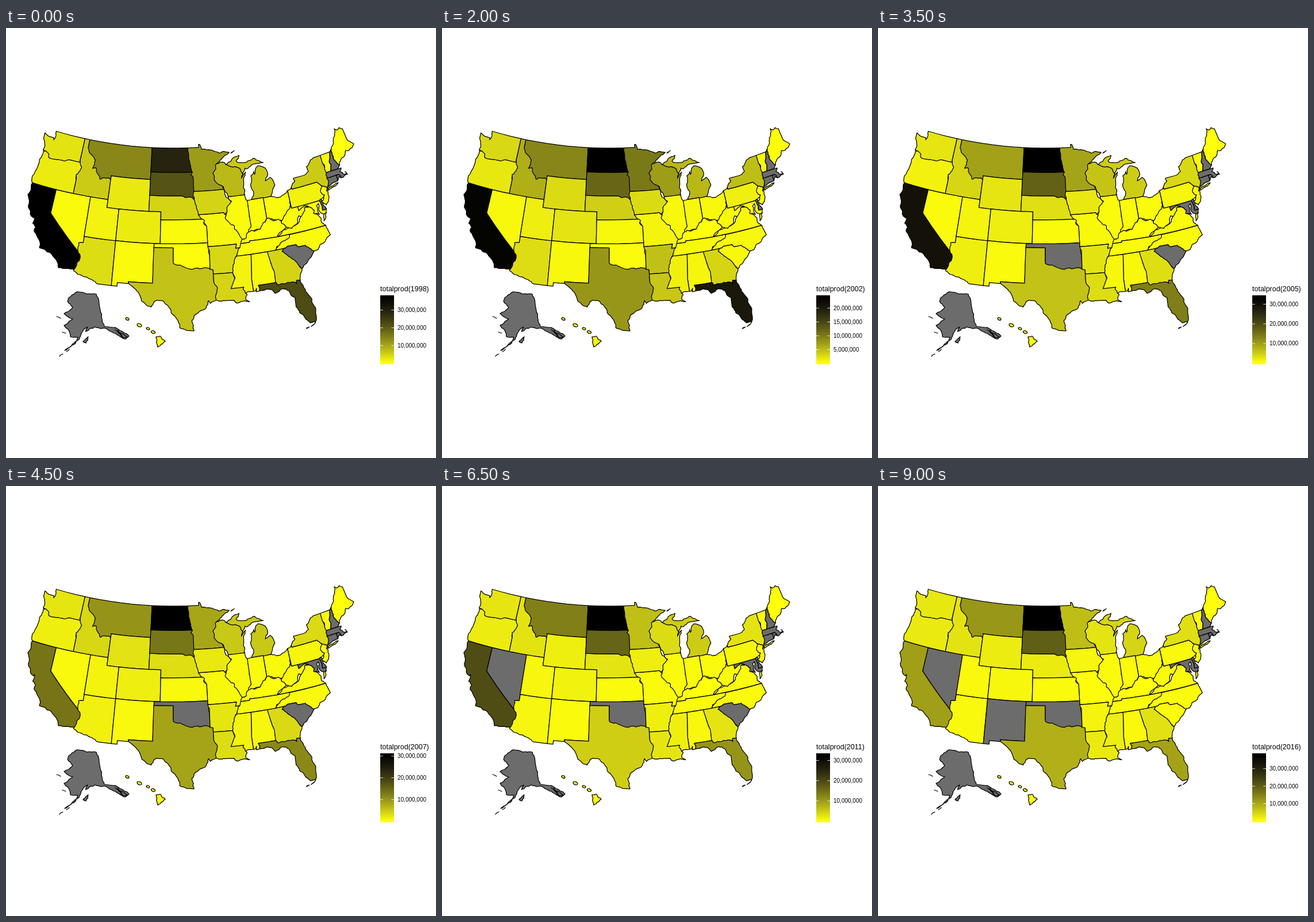
Recreate the animation shown at these times as an HTML page with a canvas. Size 748 by 748 pixels, loop 9.5 s.

```html
<!DOCTYPE html>
<html lang="en">
<head>
<meta charset="utf-8">
<title>Total production by state</title>
<style>
html, body { margin: 0; width: 100%; height: 100%; overflow: hidden; background: #fff; }
canvas { display: block; width: 748px; height: 748px; }
</style>
</head>
<body>
<canvas id="map" width="748" height="748"></canvas>
<script>
const ctx = document.getElementById('map').getContext('2d');
const START = 1998, YEARS = 19, HOLD = 500;
const parts = [];

// A corner is "west,north" in degrees. Borders along a meridian or parallel stay
// straight, "/" keeps the next diagonal straight, all others become rough.
// Later states cover the loose edges of earlier ones.
function state(id, outline, trend = '98:.8') {
  parts.push({ id, path: trace(outline, project), keys: keysOf(trend) });
}

// Sparse "yy:millions" keys, joined linearly over the years.
const keysOf = trend => trend && trend.split(' ').map(k => {
  const [y, v] = k.split(':').map(Number);
  return [y > 50 ? 1900 + y : 2000 + y, v];
});

// Azimuthal equal-area projection centred on 45 N, 100 W.
function project(lon, lat) {
  const r = Math.PI / 180, d = (100 - lon) * r, s = Math.sin(lat * r), c = Math.cos(lat * r);
  const h = Math.SQRT1_2, k = 795 * Math.sqrt(2 / (1 + h * (s + c * Math.cos(d))));
  return [291 + k * c * Math.sin(d), 264.5 - k * h * (s - c * Math.cos(d))];
}

// Midpoint displacement, equal in both directions so neighbours share a border.
function rough(path, [ax, ay], [bx, by]) {
  const dx = bx - ax, dy = by - ay, len = Math.hypot(dx, dy);
  if (len < 4) return path.lineTo(bx, by);
  const mx = (ax + bx) / 2, my = (ay + by) / 2;
  const seed = Math.sin(mx * 12.9898 + my * 78.233) * 43758.5453;
  const w = (seed - Math.floor(seed) - 0.5) * 0.3 * Math.sign(dx || dy) * Math.min(1, 11 / len);
  const mid = [mx - dy * w, my + dx * w];
  rough(path, [ax, ay], mid);
  rough(path, mid, [bx, by]);
}

function trace(outline, place) {
  const path = new Path2D();
  for (const ring of outline.split('|')) {
    const pts = ring.split(' ').map(p => ({ ruled: p[0] === '/', at: p.replace('/', '').split(',').map(Number) }));
    path.moveTo(...place(...pts[0].at));
    pts.forEach(({ ruled, at: [x, y] }, i) => {
      const [u, v] = pts[(i + 1) % pts.length].at;
      if (!ruled && Math.min(Math.abs(u - x), Math.abs(v - y)) > 0.09) {
        return rough(path, place(x, y), place(u, v));
      }
      const n = Math.ceil(Math.abs(u - x) / 2) || 1;
      for (let j = 1; j <= n; j++) path.lineTo(...place(x + (u - x) * j / n, y + (v - y) * j / n));
    });
    path.closePath();
  }
  return path;
}

// West
state('ID', '117.03,49 116.05,49 116.05,48 112,45 111.05,44.7 111.05,42 117.03,42 117.03,43.9 117.25,44.4 117.04,45', '98:6 02:6 05:4.3 11:2.9 16:3.3');
state('MT', '116.05,49 104.05,49 104.05,45 111.05,45 111.05,44.5 111.4,44.7 112.9,44.36 113.45,44.95 113.95,45.7 114.55,45.56 114.32,46.65 115.7,47.45 116.05,48', '98:14.2 02:9.2 07:10.2 11:13.3 14:14.3 16:12.2');
state('AZ', '114.04,37 109.05,37 109.05,31.33 111.07,31.33 /114.81,32.5 115,33.2 114.9,34 114.85,35.3 114.9,36.2 114.04,36.2', '98:4 02:2.6 05:1.8 11:1.1 16:.9');
state('OR', '123.95,46.2 124.07,44.7 124.15,43.9 124.55,42.84 124.2,42 117.03,42 117.03,43.8 117.2,44.4 116.5,45.4 116.92,45.99 118.98,46 122.5,46 123,46.3', '98:2.4 05:1.5 16:2.6');
state('WA', '122.76,49 117.03,49 117.04,46.43 116.92,45.99 118.98,46 120.2,45.73 121.2,45.62 122.2,45.55 122.75,45.65 122.85,46.05 123.45,46.26 124.05,46.28 123.95,46.72 124.2,47.2 124.65,47.9 124.72,48.38 123.5,48.13 122.78,48.13 122.75,47.9 122.55,48.4', '98:3.3 07:2.6 16:2.8');
state('NV', '120,42 114.04,42 114.04,36.2 114.74,36.1 /114.63,35 120,39');
state('CA', '124.2,42 120,42 /120,39 114.63,35 114.14,34.3 114.53,33.5 114.72,32.72 117.12,32.53 117.28,33 118.1,33.73 118.5,34.03 119.2,34.15 119.6,34.4 120.5,34.45 120.6,35.1 121.9,36.3 121.8,36.8 122.4,37.2 122.3,37.6 122.4,38.07 122.52,37.85 122.95,38.02 123.7,38.9 123.8,39.5 124.38,40.44 124.1,41', '98:37.4 02:23.5 03:32.2 04:17.6 05:30 07:13.6 10:27.5 12:11.6 16:11.2');
state('UT', '114.04,42 111.05,42 111.05,41 109.05,41 109.05,37 114.04,37', '98:1.6 16:1');
state('WY', '111.05,45 104.05,45 104.05,41 111.05,41', '98:2.7 07:2.8 11:1.8 16:2.3');
state('CO', '109.05,41 102.05,41 102.05,37 109.05,37', '98:2.4 16:1.2');
state('NM', '109.05,37 103,37 103.04,32 106.62,32 /106.53,31.78 108.21,31.78 108.21,31.33 109.05,31.33');

// Plains and upper river valley
state('TX', '103.04,32 103.04,36.5 100,36.5 100,34.8 94.3,34 94.04,33.55 94.04,32 93.4,31.3 93.85,29.7 94.7,29.35 94.95,29.7 95.3,28.9 96.3,28.4 97.1,27.8 97.4,27.3 97.15,25.96 98.2,26.05 99.1,26.4 99.5,27.5 100.3,28.3 100.7,29.1 101.4,29.77 102.3,29.88 102.7,29.7 103.15,28.98 104.5,29.65 104.95,30.6 106.53,31.78 106.62,32', '98:7 02:7.9 05:6.3 07:8.6 11:4.9 14:9 16:9.2');
state('OK', '103,37 94.62,37 /94.43,35.4 94.48,33.64 95.25,33.92 96,33.75 96.65,33.9 97.2,33.75 97.9,33.9 98.6,34.15 100,34.56 100,36.5 103,36.5', '98:.6');
state('MN', '97.23,49 95.15,49 95.15,49.38 94.9,49.35 94.6,48.72 93.3,48.62 92,48.3 91.4,48.07 90.8,48.2 89.5,48 91.3,47.2 92.1,46.75 92,46.1 92,44.5 91.2,43.5 96.7,43.5 97.3,47', '98:11.5 05:9.5 11:6.4 16:7.5');
state('WI', '92.1,46.75 90.85,46.9 90.4,46.57 89.1,46.13 88.1,45.9 87.6,45.1 87.95,44.6 87.05,45.27 87.7,43.8 87.8,42.49 90.64,42.5 91.2,43.5 91.3,43.85 92.77,44.75 92.87,45.62 92.3,46.1 92.3,46.66', '98:8 02:7.4 07:5.2 11:3.6 16:3.2');
state('MO', '96,40.58 91.73,40.61 90.9,39.5 90,38.7 89.15,36.95 89.55,36 90.37,36 90.15,36.5 94.62,36.5 94.62,39 95.5,40', '98:1.2 16:.6');
state('IA', '96.7,43.5 91.2,43.5 91.1,42.75 90,41.8 91,40.7 91.42,40.38 91.73,40.61 96,40.58 96.7,42.5', '98:5 02:2.8 16:1.3');
state('NE', '104.05,43 97,43 96.45,42.49 96.1,41.7 95.87,40.75 95.3,40 102.05,40 102.05,41 104.05,41', '98:5 02:3.6 16:2.4');
state('KS', '102.05,40 95.3,40 94.9,39.8 95.1,39.5 94.61,39.1 94.62,37 102.05,37');
state('ND', '104.05,49 97.23,49 97.1,48 96.8,46.7 96.56,45.94 104.05,45.94', '98:29.4 00:34.5 01:26.9 02:24 05:33.7 06:25.9 08:35.1 10:46.4 11:32.7 13:33.1 14:42.1 16:37.8');
state('SD', '104.05,45.94 96.56,45.94 96.85,45.6 96.45,45.3 96.45,43.5 96.6,43.1 96.45,42.49 97.2,42.85 97.9,42.77 98.5,43 104.05,43', '98:21.4 02:12 05:17.4 07:13.3 11:16.5 14:24.4 16:19.9');

// South
state('AR', '94.62,36.5 90.15,36.5 90.37,36 89.6,36 90.8,33.9 91.1,33 94.04,33.02 94.04,33.55 /94.48,33.64 94.43,35.4', '98:4.6 02:4.7 05:3 11:1.8 16:1.5');
state('LA', '94.04,33.02 91.1,33 90.9,32 91.2,31.1 89.6,31 89.5,30.2 89.35,30 89.6,29.4 89.1,29.1 89.8,29.3 90.9,29.1 91.3,29.5 92.2,29.55 93.85,29.7 93.55,31.2 94.04,32', '98:5 05:3.6 11:2.7 16:2.6');
state('NC', '84.3,35 83.1,35 /82.4,35.2 81.05,35.15 /80.78,34.82 79.67,34.8 /78.55,33.86 77.95,33.88 77.4,34.45 76.55,34.65 /75.55,35.25 75.75,36 75.87,36.55 83,36.55');
state('SC', '83.1,35 /82.4,35.2 81.05,35.15 /80.78,34.82 79.67,34.8 /78.55,33.86 79.2,33.2 79.9,32.7 80.88,32.05 82,33.2 83.3,34.7');
state('AL', '88.2,35 85.6,35 /85.18,32.87 84.9,32.3 85.05,31 87.6,31 87.5,30.28 88,30.23 87.9,30.65 88.1,30.35 88.4,30.35 /88.47,31.9 88.1,34.9', '98:1');
state('GA', '85.6,35 83.1,35 83.35,34.7 82.6,34 81.5,33 80.88,32.03 81.45,30.7 82,30.5 84.9,30.6 85.05,31 85,32.3 /85.18,32.87', '98:5 02:3.2 07:3.6 11:2.8 14:4.2 16:3.6');
state('MS', '90.3,35 88.2,35 /88.1,34.9 88.47,31.9 88.4,30.35 89.55,30.2 89.85,30.7 89.73,31 91.6,31 90.9,32.2 91.15,33 91,33.95', '98:1.6 05:1.1 14:2.1');
state('FL', '87.6,31 85,31 84.86,30.7 82.2,30.57 82.05,30.37 82,30.78 81.45,30.7 /81,29.2 80.55,28.45 /80.35,27.5 80.03,26.8 80.15,25.75 80.4,25.2 81.1,25.15 81.75,25.95 82.7,27.5 82.65,28.7 83.7,29.95 84.2,30.08 85.35,29.66 85.7,30.15 86.5,30.38 87.5,30.28|80.35,25.2 80.75,24.85 81.1,24.68 80.7,24.83|81.35,24.67 81.8,24.55 81.5,24.67', '98:22.5 00:24.4 02:20.5 05:13.8 07:11.4 11:11 14:14.7 16:10.8');

// Middle and lakes
state('VA', '83.68,36.6 75.87,36.55 76.4,37 76.3,37.6 77,38.3 77.04,38.8 77.72,39.32 78.35,39.42 79.3,38.5 80,37.7 82.5,37.3|75.25,38.03 75.95,37.13 75.65,37.95');
state('OH', '84.8,41.7 83.45,41.73 82.5,41.38 81.7,41.5 80.52,41.98 80.52,40.64 80.8,39.5 82,38.5 84.82,39.1');
state('IL', '90.64,42.5 87.8,42.49 87.52,41.7 87.4,38.5 88.45,37 89.15,37 89.5,37.5 90.2,38.4 90.15,38.8 90.7,39 91.5,40 91.1,40.65 91.05,41.2 90.15,41.9');
state('IN', '87.52,41.7 86.8,41.76 84.8,41.76 84.82,39.1 86,37.9 88,37.7 88,38.05 87.5,38.45 87.53,39.35');
state('KY', '89.45,36.5 88.07,36.5 88.07,36.68 83.68,36.6 81.97,37.54 82.6,38.15 82.6,38.42 83,38.73 83.7,38.65 84.45,39.12 84.82,39.1 85.2,38.68 85.45,38.7 86.05,37.97 87.1,37.8 87.6,37.95 88.05,37.8 88.45,37.4 88.5,37.1 89.15,37', '98:.3');
state('TN', '89.5,36.5 88.07,36.5 88.07,36.68 83.68,36.6 81.68,36.59 82.05,36.1 82.9,35.95 83.5,35.57 84.05,35.4 84.3,35 90.3,35');
state('WV', '81.97,37.54 82.6,38.15 82.6,38.42 81.75,39.1 80.85,39.7 80.52,40.64 80.52,39.72 79.48,39.72 79.3,39.3 78.3,39.65 77.72,39.32 78.35,39.42 78.87,38.77 79.3,38.42 79.65,38.58 80.3,37.6 81.2,37.25');
state('MD', '79.48,39.72 75.79,39.72 75.7,38.46 75.05,38.45 75.25,38.03 75.65,37.95 76.25,38.4 76.1,39.4 76.45,39.2 76.35,38.07 77.25,38.4 77.04,38.8 77.72,39.32 78.35,39.62 79.48,39.2', '98:.3');
state('PA', '80.52,41.98 79.76,42.25 79.76,42 75.35,42 74.7,41.36 75,40.4 74.7,40.15 75.55,39.82 75.79,39.72 80.52,39.72', '98:1.7 05:1.2 16:1');

// Northeast
state('DE', '75.79,39.72 75.55,39.83 75.4,39.1 75.05,38.45 75.7,38.46', '');
state('NJ', '/74.7,41.36 73.9,41 74.2,40.6 74,40.45 74.1,39.75 74.9,38.95 75.5,39.5 74.72,40.18 75.2,40.65');
state('NY', '79.76,42 79.76,42.27 78.9,42.9 79.05,43.27 77.5,43.27 76.2,43.57 76.3,44.2 75.3,44.85 74.7,45 73.34,45.01 73.2,42.8 73.5,41.3 73.95,40.75 /73.9,41 74.7,41.36 75.35,42|74.03,40.6 73.7,40.87 72.3,41.1 71.9,41.07 72.6,40.8', '98:6 07:3.5 11:2.9 16:3.8');
state('VT', '73.34,45.01 71.5,45.01 72.05,44.1 72.46,42.73 73.26,42.75 73.4,44.1');
state('NH', '71.5,45.01 71.08,45.3 70.98,43.4 70.7,43.07 71.3,42.7 72.46,42.73 72.05,44.1', '');
state('ME', '71.08,45.3 70.4,45.8 70.05,46.4 /69.23,47.46 68.9,47.2 68.3,47.35 67.8,47.07 67.8,45.7 66.97,44.8 68.2,44.3 68.8,44.45 69.05,44.1 70.2,43.6 70.7,43.07 70.98,43.4', '98:.3');
state('MA', '73.26,42.75 72.46,42.73 71.3,42.7 70.6,42.65 71,42.3 70.5,41.78 70,41.78 70.2,42.07 69.95,41.67 71.12,41.5 71.38,42.02 73.5,42.05', '');
state('RI', '71.8,42.02 71.38,42.02 71.15,41.5 71.4,41.75 71.86,41.32', '');
state('CT', '73.5,42.05 71.8,42.02 71.86,41.32 72.9,41.25 73.65,41', '');
state('MI', '86.8,41.76 86.2,42.7 86.53,43.65 86.25,44.7 85.6,45.17 85.55,44.8 85.35,45.25 84.75,45.78 83.45,45.3 83.35,44.3 83.9,43.75 82.95,44.07 82.42,43 83.15,42.1 83.45,41.73 84.8,41.7 84.8,41.76|90.4,46.57 88.45,47.37 87.75,47.47 88.45,46.8 87.4,46.5 86.6,46.45 85,46.77 84.6,46.47 83.6,46.05 85.5,46.08 86.6,45.65 87.05,45.77 87.6,45.1 87.8,45.35 88.1,45.9 89.1,46.13|89.2,47.88 88.5,48.15 88.75,48.03', '98:6.3 02:5.3 16:5');

// Insets, in stage pixels
function inset(id, outline, trend) {
  parts.push({ id, path: trace(outline, (x, y) => [x, y]), keys: keysOf(trend) });
}
inset('AK', '126,459 145,462 157,463 /171,519 187,521 205,530 214,536 208,541 190,531 172,522 155,520 138,528 142,520 131,531 127,542 110,556 102,561 123,544 125,538 112,537 109,526 101,517 116,506 101,497 112,490 116,486 107,475 111,468|134,545 143,537 139,548|88,502 95,505|98,529 104,531|105,563 110,559|93,571 99,567', '');
inset('AK', '190,525 212,538 204,539|195,525 202,536', '');
inset('HI', '261,537 268,536 277,545 268,553 264,555', '98:.9');
for (const [x, y, r] of [[211, 506, 2.7], [232, 517, 3.5], [247, 523, 2.5], [256, 529, 3]]) {
  const path = new Path2D();
  path.ellipse(x, y, r * 1.2, r * 0.75, 0.4, 0, 7);
  parts.push({ id: 'HI', path, keys: [[START, 0.9]] });
}

function missing(id, y) {
  if (id === 'OK' || id === 'MD') return y > 2003;
  if (id === 'NV') return y > 2008;
  if (id === 'NM') return y > 2012;
  return id === 'SC' && (y < 2000 || y > 2002 && y < 2013);
}

function valueAt({ id, keys }, y) {
  if (!keys || missing(id, y)) return null;
  const next = keys.findIndex(k => k[0] >= y);
  if (next < 0) return keys[keys.length - 1][1];
  if (next === 0) return keys[0][1];
  const [y0, v0] = keys[next - 1], [y1, v1] = keys[next];
  return v0 + (v1 - v0) * (y - y0) / (y1 - y0);
}

// Yellow to black through Lab, slightly darkened in the mid tones.
function shade(t) {
  const q = 1 - Math.min(1, Math.max(0, t));
  const inv = f => f > 6 / 29 ? f ** 3 : (f - 4 / 29) * 0.12842;
  const fy = (97.14 * q + 16) / 116;
  const X = 0.9505 * inv(fy - 21.55 * q / 500), Y = inv(fy), Z = 1.089 * inv(fy - 94.48 * q / 200);
  const rgb = [3.2406 * X - 1.5372 * Y - 0.4986 * Z, -0.9689 * X + 1.8758 * Y + 0.0415 * Z, 0.0557 * X - 0.204 * Y + 1.057 * Z];
  return 'rgb(' + rgb.map((v, i) => {
    const g = v <= 0.0031308 ? 12.92 * v : 1.055 * v ** (1 / 2.4) - 0.055;
    return Math.round(255 * Math.min(1, Math.max(0, g)) ** 1.22 + (i === 2 ? 12 * q : 0));
  }) + ')';
}

function legend(year, min, max) {
  ctx.fillStyle = '#000';
  ctx.font = '12.5px "Liberation Sans", Arial, sans-serif';
  ctx.fillText(`totalprod(${year})`, 651, 458);
  for (let i = 0; i < 120; i++) {
    ctx.fillStyle = shade((117 - i) / 114);
    ctx.fillRect(651, 465 + i, 24, 1);
  }
  ctx.font = '10px "Liberation Sans", Arial, sans-serif';
  const step = max < 29 ? 5 : 10;
  for (let v = step; v <= max; v += step) {
    const y = 582 - 114 * (v - min) / (max - min);
    ctx.fillStyle = '#fff';
    ctx.fillRect(651, y - 0.4, 4.8, 0.8);
    ctx.fillRect(670.2, y - 0.4, 4.8, 0.8);
    ctx.fillStyle = '#000';
    ctx.fillText((v * 1e6).toLocaleString('en-US'), 681, y + 3.6);
  }
}

function draw(year) {
  const values = parts.map(p => valueAt(p, year));
  const known = values.filter(v => v !== null);
  const min = Math.min(...known), max = Math.max(...known);
  ctx.fillStyle = '#fff';
  ctx.fillRect(0, 0, 748, 748);
  ctx.strokeStyle = '#000';
  ctx.lineWidth = 1.25;
  ctx.lineJoin = 'round';
  parts.forEach((p, i) => {
    ctx.fillStyle = values[i] === null ? '#6c6c6c' : shade((values[i] - min) / (max - min));
    ctx.fill(p.path);
    ctx.stroke(p.path);
  });
  legend(year, min, max);
}

let shown = 0;
function tick() {
  const year = START + Math.floor(performance.now() / HOLD) % YEARS;
  if (year !== shown) draw(shown = year);
  requestAnimationFrame(tick);
}
tick();
</script>
</body>
</html>
```
